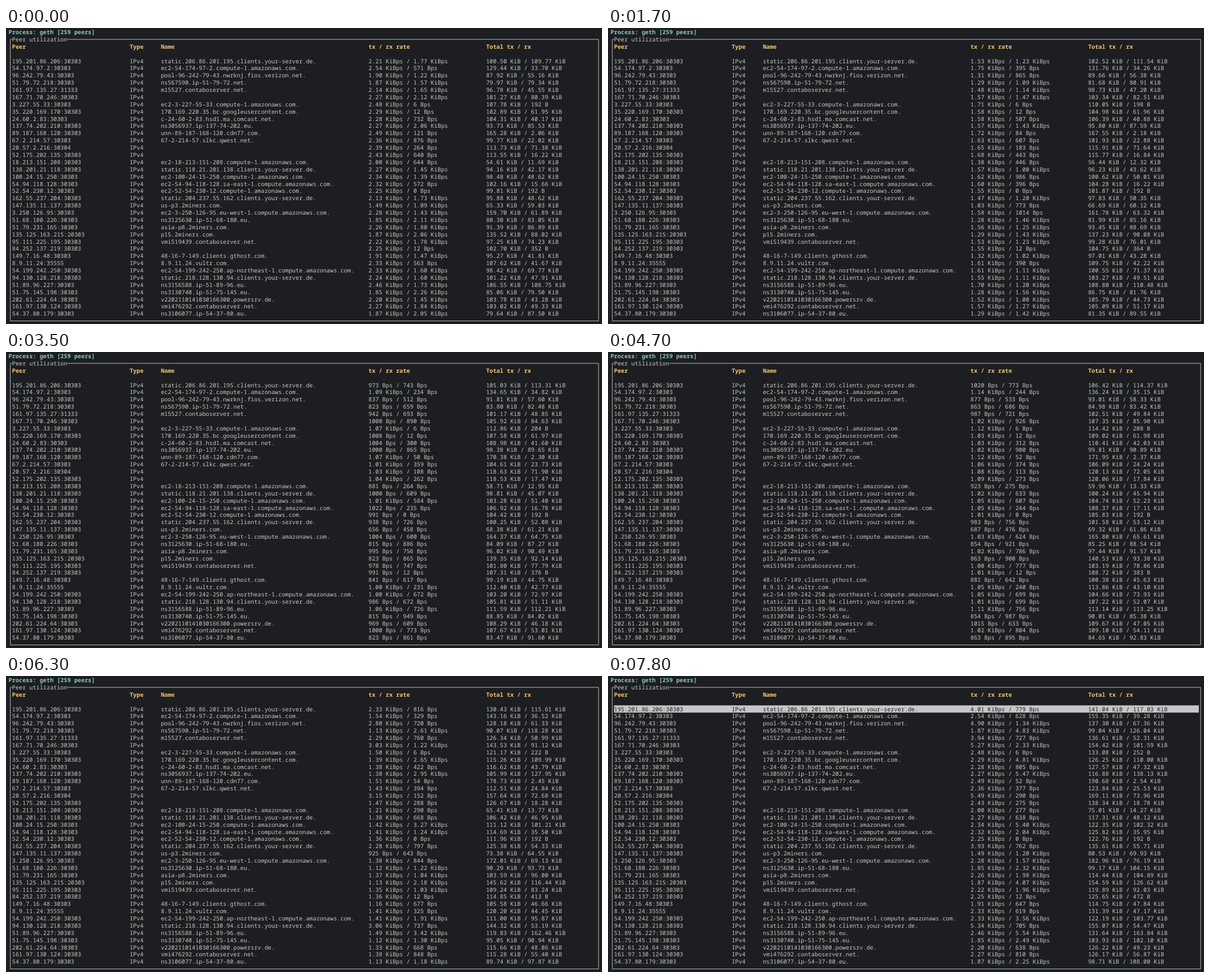
Recreate the animation shown at these times as an HTML page. Size 1061 px wide and 528 px high, loop 8 s.

```html
<!DOCTYPE html>
<html lang="en">
<head>
<meta charset="utf-8">
<title>Peer utilization</title>
<style>
  html, body { margin: 0; width: 100%; height: 100%; overflow: hidden; background: #1c1e21; }
  svg { display: block; width: 1061px; height: 528px; }
  text {
    font: 10.267px "Noto Sans Mono", "DejaVu Sans Mono", monospace;
    fill: #c5c8c6;
    white-space: pre;
    text-rendering: geometricPrecision;
  }
  .title { fill: #8fc7bd; font-weight: 700; }
  .head { fill: #f6c471; font-weight: 700; }
  .frame { fill: none; stroke: #b9bcbb; stroke-width: 1; }
  .bar { fill: #c5c8c6; visibility: hidden; }
  .selected .bar { visibility: visible; }
  .selected .first { fill: #1c1e21; }
</style>
</head>
<body>
<svg id="screen" viewBox="0 0 1061 528"></svg>
<script>
const LOOP = 8000, SELECT_AT = 7800, BURST_AT = 5200;
const CELL_W = 6.16, CELL_H = 12.88, LEFT = 4.6, TOP = 0.9;
const COLUMNS = { Peer: 1, Type: 35, Name: 44, 'tx / rx rate': 104, 'Total tx / rx': 138 };

// peer, host name, tx rate, rx rate, total tx, total rx; a decimal point means KiB, otherwise bytes
const peers = `
195.201.86.206:30303 static.206.86.201.195.clients.your-server.de. 2.21 1.77 100.50 109.77
54.174.97.2:30303 ec2-54-174-97-2.compute-1.amazonaws.com. 2.54 571 129.44 33.70
96.242.79.43:30303 pool-96-242-79-43.nwrknj.fios.verizon.net. 1.90 1.22 87.92 55.16
51.79.72.218:30303 ns567590.ip-51-79-72.net. 1.87 1.57 79.97 79.34
161.97.135.27:31333 m15527.contaboserver.net. 2.14 1.65 96.78 45.55
167.71.70.246:30303 - 2.27 2.12 101.27 80.39
3.227.55.33:30303 ec2-3-227-55-33.compute-1.amazonaws.com. 2.48 6 107.78 192
35.220.169.170:30303 170.169.220.35.bc.googleusercontent.com. 2.29 12 102.89 61.95
24.60.2.83:30303 c-24-60-2-83.hsd1.ma.comcast.net. 2.28 732 104.31 40.17
137.74.202.210:30303 ns3056937.ip-137-74-202.eu. 2.27 2.06 93.73 85.53
89.187.168.120:30303 unn-89-187-168-120.cdn77.com. 2.49 121 165.28 2.06
67.2.214.57:30303 67-2-214-57.slkc.qwest.net. 2.36 876 99.77 22.02
20.57.2.216:30304 - 2.39 264 113.73 71.38
52.175.202.135:30303 - 2.43 640 113.55 16.22
18.213.151.208:30303 ec2-18-213-151-208.compute-1.amazonaws.com. 2.00 644 54.61 11.69
138.201.21.118:30303 static.118.21.201.138.clients.your-server.de. 2.27 1.45 94.16 42.17
100.24.15.250:30303 ec2-100-24-15-250.compute-1.amazonaws.com. 2.34 1.39 98.48 48.62
54.94.118.128:30303 ec2-54-94-118-128.sa-east-1.compute.amazonaws.com. 2.32 572 102.16 15.66
52.54.230.12:30303 ec2-52-54-230-12.compute-1.amazonaws.com. 2.25 0 99.81 192
162.55.237.204:30303 static.204.237.55.162.clients.your-server.de. 2.13 1.73 95.88 48.62
147.135.11.137:30303 us-p3.2miners.com. 1.49 1.09 65.33 59.03
3.250.126.95:30303 ec2-3-250-126-95.eu-west-1.compute.amazonaws.com. 2.28 1.43 159.70 61.89
51.68.180.226:30303 ns3125630.ip-51-68-180.eu. 1.85 2.11 80.30 83.05
51.79.231.165:30303 asia-p8.2miners.com. 2.26 1.80 91.39 86.89
135.125.163.215:20303 p15.2miners.com. 1.87 2.06 135.52 88.02
95.111.225.195:30303 vmi519439.contaboserver.net. 2.22 1.78 97.25 74.23
84.252.137.219:30303 - 2.25 12 102.70 352
149.7.16.48:30303 48-16-7-149.clients.gthost.com. 1.91 1.47 95.27 41.81
8.9.11.24:35555 8.9.11.24.vultr.com. 2.33 563 107.62 41.67
54.199.242.250:30303 ec2-54-199-242-250.ap-northeast-1.compute.amazonaws.com. 2.33 1.60 98.42 69.77
94.130.128.218:30303 static.218.128.130.94.clients.your-server.de. 2.24 1.60 101.22 47.91
51.89.96.227:30303 ns3156588.ip-51-89-96.eu. 2.46 1.73 106.55 108.75
51.75.145.198:30303 ns3130740.ip-51-75-145.eu. 1.85 2.26 85.06 79.50
202.61.224.64:30303 v2202110141030166300.powersrv.de. 2.20 1.45 103.78 43.28
161.97.130.124:30303 vmi476292.contaboserver.net. 2.27 1.84 103.02 49.33
54.37.80.179:30303 ns3106077.ip-54-37-80.eu. 1.87 2.05 79.64 87.50`.trim().split('\n');

// KiB sent or received at once by single peers
const txBurst = { 0: 18, 2: 30, 4: 18, 5: 30, 12: 31, 19: 18, 30: 31 };
const rxBurst = { 3: 31, 7: 48, 9: 32, 16: 48, 17: 18, 24: 18, 29: 18, 31: 48 };
const quietRx = new Set([0, 4, 7, 10, 11, 13, 14, 15, 16, 17, 19, 27, 30, 31, 33, 34]);

// Each curve has one value per key time; the display refreshes at the ticks
const rate = {
  keys: [0, 100, 2200, 3500, 5200, 7200, 7800],
  ticks: [0, 100, 1200, 2200, 3500, 4200, 5200, 6300, 7200, 7800],
  tx: [1, .957, .449, .43, .48, .71, 1],
  rx: [1, .97, .44, .41, .45, .68, 1.1],
  quiet: [1, .97, .44, .41, .45, .45, .43],
  burst: [0, 0, 0, 0, 0, .1, .1],
};
const total = {
  keys: [0, 700, 2200, 3500, 5700, 7200, 7800],
  ticks: [0, 100, 700, 1200, 1700, 2200, 3500, 3700, 4200, 4700, 5200, 5700, 6300, 6800, 7200, 7700, 7800],
  tx: [0, .4, 1.17, 2.05, 3.2, 8.7, 10.2],
  rx: [0, .4, 1.3, 2, 3.1, 8, 10],
  quiet: [0, .4, 1.3, 2, 3.1, 3.6, 4.1],
};

const lastTick = (ticks, t) => ticks.filter(tick => tick <= t).pop();
const toBytes = s => s.includes('.') ? s * 1024 : +s;
const format = n => n < 1023.5 ? `${Math.round(n)} B` : `${(n / 1024).toFixed(2)} KiB`;
const pair = (tx, rx, suffix = '') => `${format(tx)}${suffix} / ${format(rx)}${suffix}`;

function sample(keys, values, t) {
  const i = keys.findIndex(key => key >= t);
  if (i <= 0) return values[0];
  const part = (t - keys[i - 1]) / (keys[i] - keys[i - 1]);
  return values[i - 1] + (values[i] - values[i - 1]) * part;
}

const screen = document.getElementById('screen');
const colX = col => LEFT + col * CELL_W;
const midY = line => TOP + (line + .5) * CELL_H;

function add(tag, attrs, content = '') {
  const node = document.createElementNS('http://www.w3.org/2000/svg', tag);
  for (const name in attrs) node.setAttribute(name, attrs[name]);
  node.textContent = content;
  return screen.appendChild(node);
}
const write = (col, line, content, cls = '') =>
  add('text', { x: colX(col), y: midY(line) + 3.7, class: cls }, content);

const edge = { l: colX(.5), r: colX(170.5), t: midY(1), b: midY(40) };
add('path', { class: 'frame', d: `M${colX(1)} ${edge.t}H${edge.l}V${edge.b}H${edge.r}V${edge.t}H${colX(17)}` });
add('rect', { class: 'bar', x: colX(1), y: TOP + 4 * CELL_H, width: 169 * CELL_W, height: CELL_H });
write(0, 0, 'Process: geth [259 peers]', 'title');
write(1, 1, 'Peer utilization');
for (const label in COLUMNS) write(COLUMNS[label], 2, label, 'head');

const rows = peers.map((line, i) => {
  const [peer, host, ...values] = line.split(' ');
  const cls = i ? '' : 'first';
  const cell = (label, content) => write(COLUMNS[label], i + 4, content, cls);
  cell('Peer', peer);
  cell('Type', 'IPv4');
  cell('Name', host === '-' ? '' : host);
  return {
    start: values.map(toBytes),
    txBurst: (txBurst[i] || 0) * 1024,
    rxBurst: (rxBurst[i] || 0) * 1024,
    rxCurve: quietRx.has(i) ? 'quiet' : 'rx',
    rateCell: cell('tx / rx rate', ''),
    totalCell: cell('Total tx / rx', ''),
  };
});

function showRates(t) {
  const at = name => sample(rate.keys, rate[name], t);
  for (const row of rows) {
    const [tx, rx] = row.start;
    const rxScale = rx < 30 ? 1 : at(row.rxCurve);
    row.rateCell.textContent = pair(
      tx * at('tx') + row.txBurst * at('burst'),
      rx * rxScale + row.rxBurst * at('burst'), 'ps').replace(/ Bps/g, ' Bps');
  }
}

function showTotals(t) {
  const at = name => sample(total.keys, total[name], t);
  const burst = t >= BURST_AT ? 1 : 0;
  for (const row of rows) {
    const [tx, rx, sent, received] = row.start;
    row.totalCell.textContent = pair(
      sent + tx * at('tx') + row.txBurst * burst,
      received + rx * at(row.rxCurve) + row.rxBurst * burst);
  }
}

let shownRate, shownTotal;
function draw() {
  const t = performance.now() % LOOP;
  const rateTick = lastTick(rate.ticks, t), totalTick = lastTick(total.ticks, t);
  if (rateTick !== shownRate) showRates(shownRate = rateTick);
  if (totalTick !== shownTotal) showTotals(shownTotal = totalTick);
  screen.classList.toggle('selected', t >= SELECT_AT);
  requestAnimationFrame(draw);
}
draw();
</script>
</body>
</html>
```
